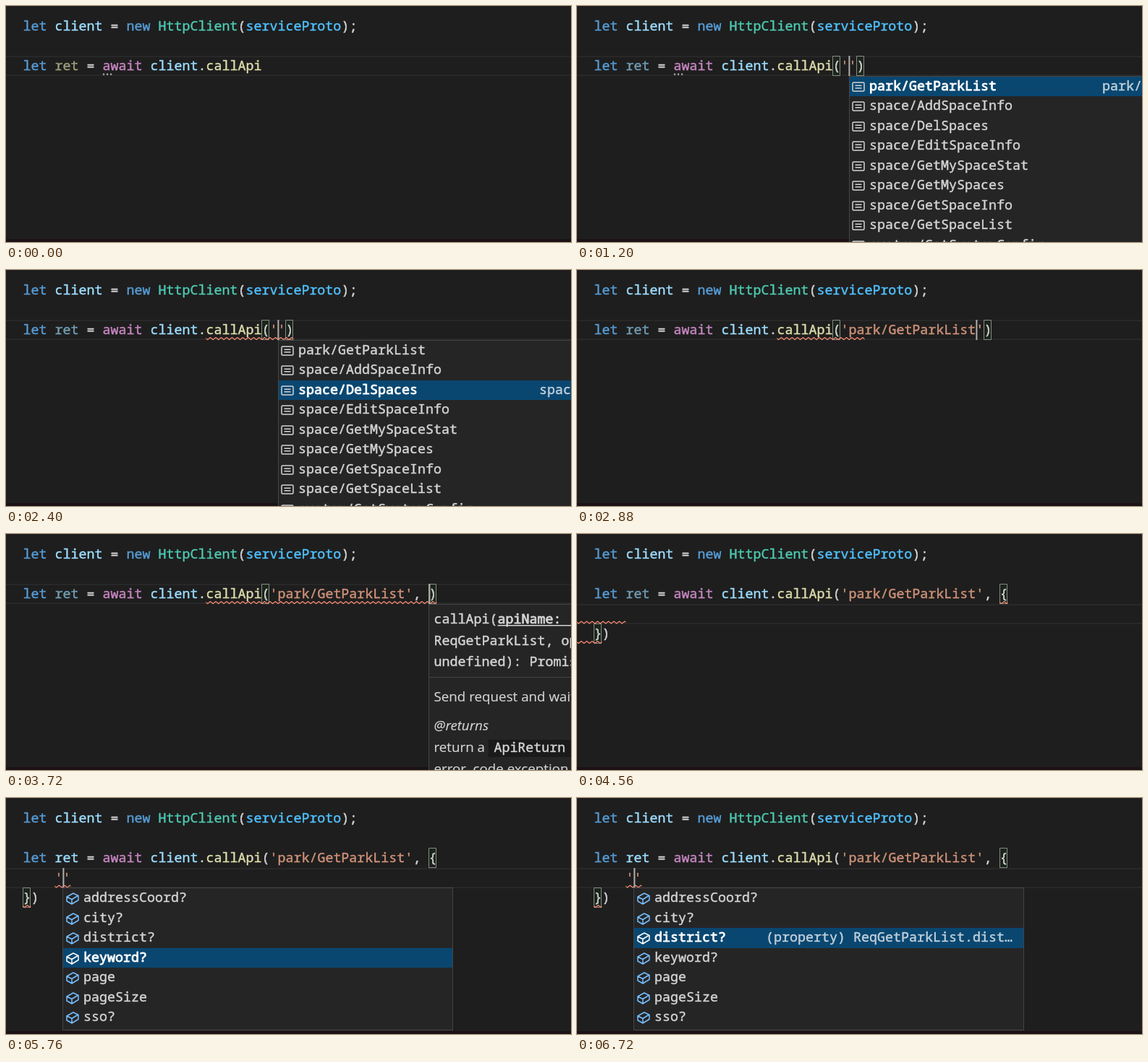
An HTML page with a canvas for the animation above (6.96 s loop, 781 px wide and 327 px high).

```html
<!DOCTYPE html>
<html>
<head>
<meta charset="utf-8">
<style>
html, body { margin: 0; width: 100%; height: 100%; overflow: hidden; background: #1e1e1e; }
canvas { display: block; }
</style>
</head>
<body>
<canvas id="stage" width="781" height="327"></canvas>
<script>
const ctx = document.getElementById('stage').getContext('2d');
const LOOP = 6960, LEFT = 23.4, CHAR = 11, ROW = 27.5;
const MONO = '18.333px "Noto Sans Mono", "DejaVu Sans Mono", monospace';
const SANS = '18.8px "Open Sans", sans-serif';
const C = {
  plain: '#d4d4d4', key: '#569cd6', name: '#9cdcfe', constant: '#4fc1ff', type: '#4ec9b0',
  flow: '#c586c0', call: '#dcdcaa', text: '#ce9178', error: '#f48771',
  panel: '#252526', edge: '#454545', select: '#094771', detail: 'rgba(255,255,255,.7)', field: '#75beff'
};
const API = 'park/GetParkList';
const apis = [API, 'space/AddSpaceInfo', 'space/DelSpaces', 'space/EditSpaceInfo', 'space/GetMySpaceStat',
  'space/GetMySpaces', 'space/GetSpaceInfo', 'space/GetSpaceList', 'system/GetSystemConfig'];
const fields = ['addressCoord?', 'city?', 'district?', 'keyword?', 'page', 'pageSize', 'sso?'];
const fieldDetails = { 0: 'ReqGetParkList.addr…', 2: 'ReqGetParkList.dist…', 6: 'BaseRequest.sso?: s…' };

const colX = col => LEFT + col * CHAR;
const lineY = line => 14.5 + line * ROW;
const within = (t, ...spans) => spans.some(([from, to]) => t >= from && t < to);
// Value of the last [time, value] step that has been reached
const stepAt = (t, steps) => steps.reduce((v, [at, next]) => t >= at ? next : v, null);

function rect(x, y, w, h, color) {
  ctx.fillStyle = color;
  ctx.fillRect(x, y, w, h);
}

// The thin outline gives the letters their slightly heavy weight
function text(str, x, y, color = C.plain, font = MONO, outline = 0.45) {
  ctx.font = font;
  ctx.fillStyle = ctx.strokeStyle = color;
  ctx.lineWidth = outline;
  ctx.lineJoin = 'round';
  ctx.fillText(str, x, y);
  ctx.strokeText(str, x, y);
  return x + ctx.measureText(str).width;
}

const prose = (str, x, y, style = '') => text(str, x, y, C.plain, style + SANS, 0.15);

function codeLine(line, col, ...parts) {
  for (const [str, color] of parts) {
    text(str, colX(col), Math.round(lineY(line) + 19.5), color);
    col += str.length;
  }
}

function squiggle(line, from, to) {
  const y = lineY(line) + 25.6;
  ctx.save();
  ctx.beginPath();
  ctx.rect(from, y - 4, to - from, 8);
  ctx.clip();
  ctx.beginPath();
  for (let x = from - 1.5, side = -1; x <= to + 4; x += 3.75, side = -side) ctx.lineTo(x, y + side * 1.5);
  ctx.strokeStyle = C.error;
  ctx.lineWidth = 1.25;
  ctx.stroke();
  ctx.restore();
}

function bracketBox(line, col) {
  const x = Math.round(colX(col)), y = Math.round(lineY(line) - 0.5);
  rect(x, y, CHAR, 28, 'rgba(0,100,0,.1)');
  ctx.strokeStyle = '#888';
  ctx.lineWidth = 1;
  ctx.strokeRect(x + 0.5, y + 0.5, CHAR - 1, 27);
}

function panel(x, y, w, h) {
  rect(x, y, w, h, C.edge);
  rect(x + 1, y + 1, w - 2, h - 2, C.panel);
}

function wordIcon(x, y) {
  ctx.strokeStyle = C.plain;
  ctx.lineWidth = 1.5;
  ctx.beginPath();
  ctx.roundRect(x + 1, y - 6, 16, 12, 1.5);
  ctx.moveTo(x + 4.5, y - 1.8);
  ctx.lineTo(x + 13.5, y - 1.8);
  ctx.moveTo(x + 4.5, y + 1.8);
  ctx.lineTo(x + 13.5, y + 1.8);
  ctx.stroke();
}

function cubeIcon(x, y, color) {
  ctx.strokeStyle = color;
  ctx.lineWidth = 1.5;
  ctx.lineJoin = 'round';
  ctx.stroke(new Path2D(`M${x + 1} ${y - 2}l9 -5l7 3.5v6l-9 5.5l-7 -4zl7 3.5l9 -5.5M${x + 8} ${y + 1.5}v6.5`));
}

function listRows(labels, top, x, width, labelX, selected, drawIcon, drawDetail) {
  labels.forEach((label, i) => {
    const y = Math.round(top + i * ROW), next = Math.round(top + (i + 1) * ROW);
    const on = i === selected, base = y + 19;
    if (on) {
      rect(x, y, width, next - y, C.select);
      drawDetail(label, i, base);
    }
    drawIcon(y + 14, on);
    text(label, labelX, base, on ? '#fff' : C.plain, MONO, on ? 0.9 : 0.45);
  });
}

function apiList(selected) {
  panel(376, 97, 530, 260);
  listRows(apis, 97.5, 377, 528, 404, selected,
    y => wordIcon(380, y),
    (label, i, base) => text(label, 902 - label.length * CHAR, base, C.detail));
}

function fieldList(selected, showDetail) {
  panel(78, 124, 540, 198);
  listRows(fields, 125, 79, 538, 107, selected,
    (y, on) => cubeIcon(83, y, on ? '#fff' : C.field),
    (label, i, base) => showDetail && text('(property) ' + fieldDetails[i], 261, base, C.detail));
}

function signatureHint(x, y, active) {
  panel(x, y, 552, 340);
  const left = x + 7.5;
  const param = (str, col, row, on) => {
    const px = left + col * CHAR, py = Math.round(y + 27 + row * 29.6);
    text(str, px, py, C.plain, MONO, on ? 0.9 : 0.45);
    if (on) rect(px, py + 2, str.length * CHAR, 1.5, C.plain);
  };
  param('callApi(', 0, 0);
  param(`apiName: "${API}"`, 8, 0, active === 0);
  param(', ', 35, 0);
  param('req:', 37, 0, active === 1);
  param('ReqGetParkList', 0, 1, active === 1);
  param(', options?: TransportOptions |', 14, 1);
  param('undefined): Promise<ApiReturn<ResGetParkList>>', 0, 2);
  rect(x + 1, y + 101, 550, 1, C.edge);
  prose('Send request and wait for the return', left, y + 135);
  prose('@returns', left, y + 175, 'italic ');
  const end = prose('return a ', left, y + 205);
  rect(end, y + 188, 115, 24, '#1a1a1a');
  text('ApiReturn', end + 7.5, y + 205);
  prose(', all error (network error, business', end + 115, y + 205);
  prose('error, code exception...) is unified to ApiError', left, y + 235);
}

function draw(t) {
  const multiline = t >= 3960;
  const current = multiline ? 3 : 2;
  rect(0, 0, 781, 327, '#1e1e1e');
  rect(0, 323, 781, 4, '#1b1216');
  rect(0, Math.round(lineY(current) - 0.5), 781, 2, '#282828');
  rect(0, Math.round(lineY(current) + 25.5), 781, 2, '#282828');

  // Typed arguments: the string, and what follows it
  const arg = stepAt(t, [[0, ''], [1080, "''"], [2880, `'${API}'`]]);
  const tail = stepAt(t, [[0, ''], [1080, ')'], [3480, ',)'], [3600, ', )'], [3840, ', {})'], [3960, ', {']]);
  const closeCol = 31 + arg.length + tail.length - 1;
  const caretCol = stepAt(t, [[0, 30], [1080, 32], [2880, 48], [3120, 49], [3480, 50], [3600, 51], [3840, 52], [3960, 4], [4920, 5]]);

  if (within(t, [1080, 3840])) [30, closeCol].forEach(col => bracketBox(2, col));
  if (within(t, [3840, 3960])) [51, 52].forEach(col => bracketBox(2, col));
  if (multiline) {
    bracketBox(2, 51);
    bracketBox(4, 0);
  }

  codeLine(0, 0, ['let ', C.key], ['client', C.name], [' = ', C.plain], ['new ', C.key],
    ['HttpClient', C.type], ['(', C.plain], ['serviceProto', C.constant], [');', C.plain]);
  const retColor = stepAt(t, [[0, '#9d9d7b'], [1080, '#729db3'], [5280, C.name]]);
  codeLine(2, 0, ['let ', C.key], ['ret', retColor], [' = ', C.plain], ['await ', C.flow],
    ['client', C.name], ['.', C.plain], ['callApi', C.call],
    [t < 1080 ? '' : '(', C.plain], [arg, C.text], [tail, C.plain]);
  if (t >= 4920) codeLine(3, 4, ["''", C.text]);
  if (multiline) codeLine(4, 0, ['})', C.plain]);

  if (t < 1560) [134, 139, 144].forEach(x => rect(x, 93.5, 2.2, 2.2, '#b0b0b0'));
  if (within(t, [1560, 3960])) squiggle(2, colX(23), colX(t < 3000 ? 34 : closeCol + 1));
  if (within(t, [4080, 4920])) squiggle(3, 0, colX(4));
  if (within(t, [4080, 5280])) squiggle(4, 0, colX(1));
  if (within(t, [4440, 5280])) squiggle(2, colX(51), colX(52));
  if (t >= 5280) {
    squiggle(3, colX(4), colX(6));
    squiggle(4, colX(0), colX(1));
  }

  if (within(t, [240, 840], [1080, 1680], [2160, 2640], [2880, 3120], [3480, 4560], [4920, 5280], [5760, 6240], [6720, LOOP]))
    rect(colX(caretCol), Math.round(lineY(current) - 0.5), 2, 28, '#aeafad');

  if (within(t, [1200, 2880]))
    apiList(stepAt(t, [[0, 0], [1920, 1], [2040, 2], [2160, 3], [2400, 2], [2520, 1], [2640, 0]]));
  if (within(t, [3720, 3960])) signatureHint(584, 97, 0);
  if (within(t, [3960, 4440])) signatureHint(67, 124, t < 4200 ? 0 : 1);
  if (t >= 4920)
    fieldList(stepAt(t, [[0, 0], [5280, 6], [5520, 5], [5640, 4], [5760, 3], [5880, 2]]),
      within(t, [4920, 5280], [5400, 5520], [6000, LOOP]));
}

const start = performance.now();
function frame() {
  draw((performance.now() - start) % LOOP);
  requestAnimationFrame(frame);
}
frame();
</script>
</body>
</html>
```
